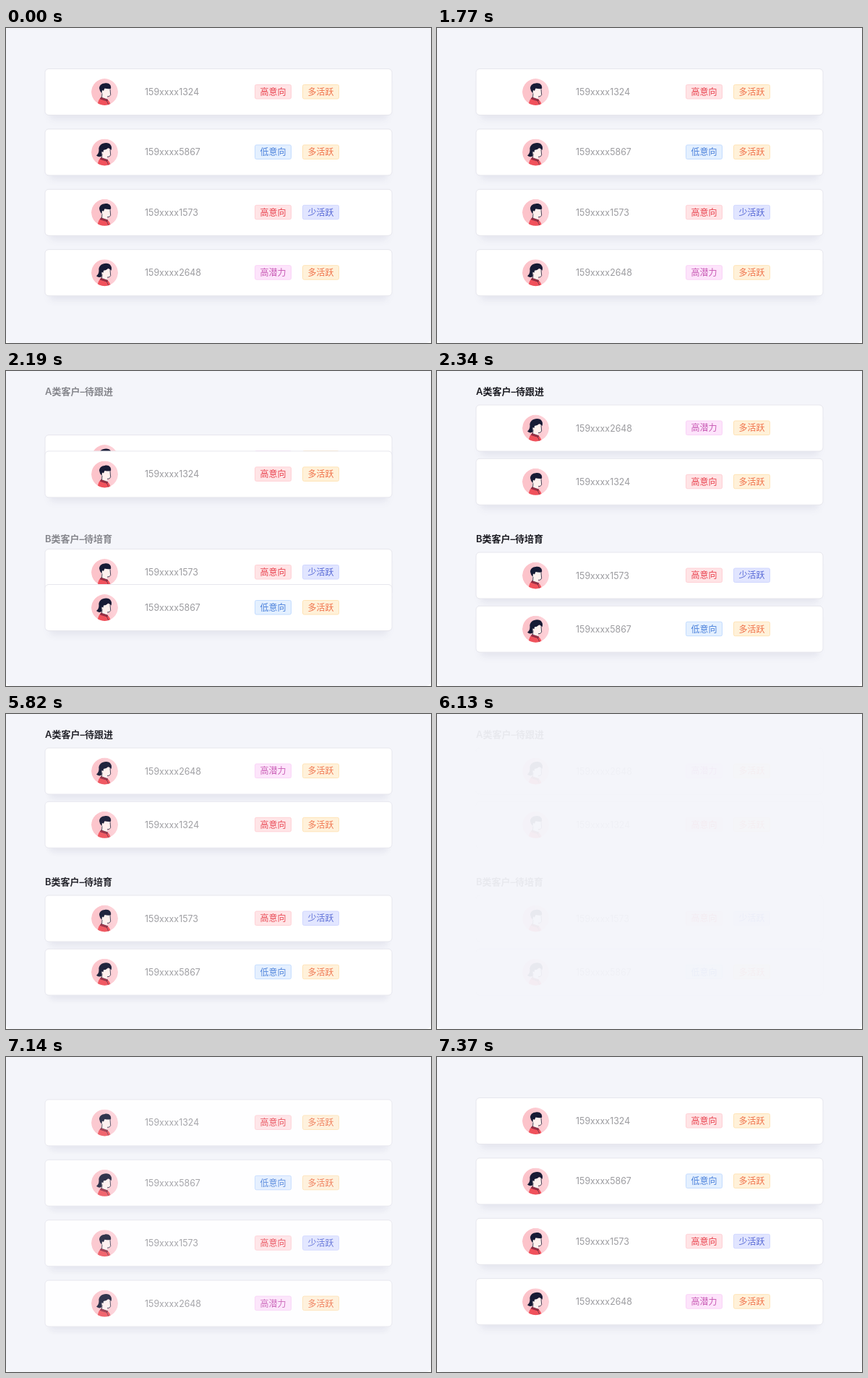
Recreate the animation shown at these times as an HTML page. Size 588 px wide and 436 px high, loop 7.7 s.

```html
<!DOCTYPE html>
<html lang="zh-CN">
<head>
<meta charset="utf-8">
<style>
html, body { margin: 0; width: 100%; height: 100%; overflow: hidden; background: #fff; }
svg { display: block; width: 588px; height: 436px; }
text { font-family: Inter, "Noto Sans CJK SC", "Noto Sans CJK", sans-serif; font-size: 12px; }
.title { font-size: 13px; font-weight: 600; fill: #1b1b22; }
.phone { font-size: 12.4px; fill: #9b9b9f; }
.panel { fill: #fff; stroke: #e6e6ed; }
.shadow { fill: rgba(50, 50, 95, .075); filter: blur(5px); }
</style>
</head>
<body>
<svg viewBox="0 0 588 436">
  <defs>
    <linearGradient id="pink" x1="0" y1="0.6" x2="1" y2="0.4">
      <stop offset="0.3" stop-color="#fcc3ca"/>
      <stop offset="0.8" stop-color="#fdd0d7"/>
    </linearGradient>
    <clipPath id="disc"><circle r="18.5"/></clipPath>
    <g id="bust">
      <circle r="18.5" fill="url(#pink)"/>
      <path d="M-5-5H7.500L8 4Q7 7 3.500 6.500L3 11L-4 9Z" fill="#fff1ee"/>
      <path d="M7.500-4L8.200 4Q7 7 3.500 6.500M-3.500 2L-4 8" fill="none" stroke="#1c2038" stroke-width=".8"/>
      <path d="M-5 7.500L4 10.500Q7.500 13 8.500 19H-10Q-9.500 11-5 7.500Z" fill="#f0525c"/>
      <path d="M-5 7.500L4 10.500L3.500 12.500L-6 9.500ZM3 12.500L5.500 18" fill="#b52f45" stroke="#3a2038" stroke-width=".6"/>
    </g>
    <g id="man" clip-path="url(#disc)">
      <use href="#bust"/>
      <path d="M-7.500-5C-7.500-9-4-12 0-12C5-13.500 10-10 8.500-4.500Q4-4 0-5L-1.500-1.500L-3.500-2.500L-4 2Q-7-1-7.500-5Z" fill="#171b35"/>
    </g>
    <g id="woman" clip-path="url(#disc)">
      <use href="#bust"/>
      <path d="M-8-3C-9-9-4-13 2-13C8-13 11-8 9-3Q7-5 5-6Q2-3-1.500-3L-2 0L-4-1L-4 5Q-7 8-11.500 4.500Q-8 2-8-3Z" fill="#171b35"/>
    </g>
  </defs>
  <path d="M0 0H588V428Q588 436 580 436H8Q0 436 0 428Z" fill="#f4f5fa"/>
  <g id="scene">
    <g id="titles">
      <text class="title" x="54" y="32.700">A类客户–待跟进</text>
      <text class="title" x="54" y="236.700">B类客户–待培育</text>
    </g>
  </g>
</svg>
<script>
const LOOP = 7700;
// label, fill, border, text
const TAGS = {
  high: ['高意向', '#ffe4e6', '#ffd0d5', '#e9434f'],
  low: ['低意向', '#e4f0ff', '#c3dcff', '#4b80db'],
  potential: ['高潜力', '#fde4fb', '#fad3f7', '#c85ab4'],
  active: ['多活跃', '#fff1d9', '#ffe3b5', '#f0714a'],
  quiet: ['少活跃', '#e1e5ff', '#d0d7ff', '#5769d6'],
};
// Back to front; from/to are the card centres in the list and in the groups
const cards = [
  { phone: '159xxxx2648', who: 'woman', tags: ['potential', 'active'], from: 338.7, to: 79 },
  { phone: '159xxxx1573', who: 'man', tags: ['high', 'quiet'], from: 255.3, to: 283 },
  { phone: '159xxxx5867', who: 'woman', tags: ['low', 'active'], from: 171.9, to: 357.2 },
  { phone: '159xxxx1324', who: 'man', tags: ['high', 'active'], from: 88.5, to: 153.3 },
];

const scene = document.getElementById('scene');
const titles = document.getElementById('titles');

function tag(name, x) {
  const [label, fill, border, color] = TAGS[name];
  return `<rect x="${x + .5}" y="-10" width="50" height="19.500" rx="2" fill="${fill}" stroke="${border}"/>
    <text x="${x + 7.4}" y="4.400" fill="${color}">${label}</text>`;
}

for (const card of cards) {
  card.node = document.createElementNS('http://www.w3.org/2000/svg', 'g');
  card.node.innerHTML = `<rect class="shadow" x="60" y="-18" width="468" height="56" rx="5"/>
    <rect class="panel" x="54" y="-32" width="480" height="64" rx="5"/>
    <use href="#${card.who}" x="136.500"/>
    <text class="phone" x="192" y="4.500">${card.phone}</text>
    ${tag(card.tags[0], 344)}${tag(card.tags[1], 410)}`;
  scene.append(card.node);
}

function bezier(x1, y1, x2, y2) {
  const at = (a, b, u) => 3 * a * u * (1 - u) ** 2 + 3 * b * u * u * (1 - u) + u ** 3;
  return x => {
    let lo = 0, hi = 1;
    for (let i = 0; i < 24; i++) {
      const mid = (lo + hi) / 2;
      if (at(x1, x2, mid) < x) lo = mid; else hi = mid;
    }
    return at(y1, y2, hi);
  };
}
const ease = bezier(.25, .1, .25, 1);
const easeInOut = bezier(.42, 0, .58, 1);
const span = (t, start, end) => Math.min(1, Math.max(0, (t - start) / (end - start)));

function draw(now) {
  const t = now % LOOP;
  const entering = t >= 6815;
  const enter = ease(span(t, 6815, 7365));
  const move = entering ? 0 : easeInOut(span(t, 1866, 2316));
  const drop = entering ? 20 * (1 - enter) : 0;

  scene.setAttribute('opacity', entering ? enter : 1 - easeInOut(span(t, 5755, 6205)));
  titles.setAttribute('opacity', entering ? 0 : easeInOut(span(t, 2040, 2340)));
  for (const { node, from, to } of cards) {
    node.setAttribute('transform', `translate(0 ${from + (to - from) * move + drop})`);
  }
}

const began = performance.now();
function frame() {
  draw(performance.now() - began);
  requestAnimationFrame(frame);
}
frame();
</script>
</body>
</html>
```
